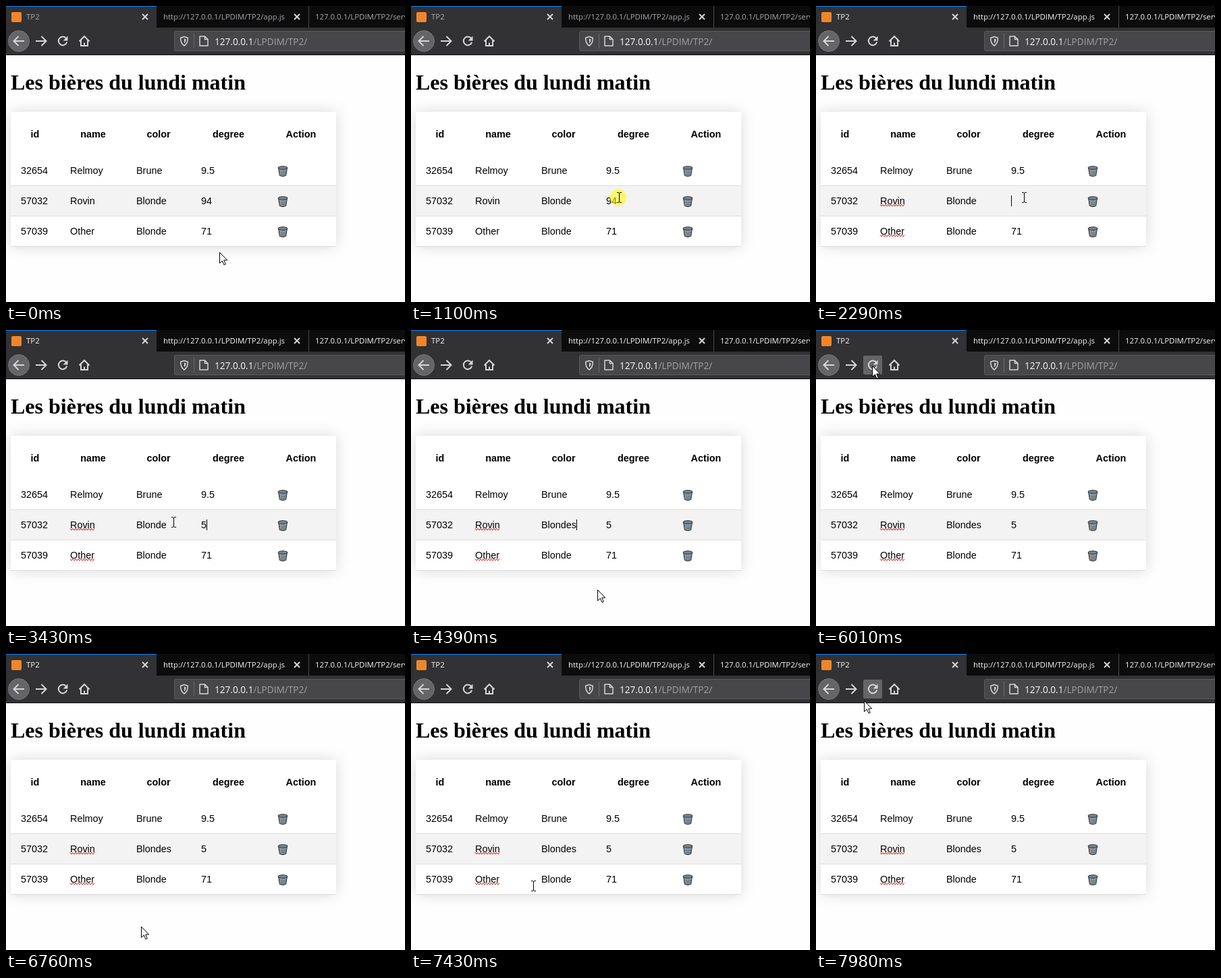
Animation of 591x439 px, one loop 8000 ms. Source, as an HTML page:

```html
<!DOCTYPE html>
<html lang="fr">
<meta charset="utf-8">
<title>TP2</title>
<style>
  html, body { margin: 0; width: 100%; height: 100%; overflow: hidden; background: #fefefe; }
  #card { position: absolute; left: 7px; top: 157px; width: 482px; height: 200px; background: #fff; box-shadow: 0 0 20px rgba(0,0,0,.15); }
  svg { position: absolute; left: 0; top: 0; }
  .ui { font-family: "Open Sans", "Noto Sans", sans-serif; }
  .tab { font-size: 11.4px; }
  .cell { font: 14.4px "Liberation Sans", Arial, sans-serif; }
  .head { font-weight: bold; text-anchor: middle; }
  .icon { fill: none; stroke: #d6d6d8; stroke-width: 2; }
  .thin { stroke-width: 1.5; stroke-linejoin: round; }
</style>
<body>
<div id="card"></div>
<svg width="591" height="439" viewBox="0 0 591 439">
  <defs>
    <g id="bin" stroke-linejoin="round">
      <path d="M-6.5-5L-4.7 6.5Q0 9 4.7 6.5L6.5-5z" fill="#94a5b1" stroke="#2b2e31"/>
      <path d="M-4.5-2L-3 6M-1.5-2L-1 7M1.500-2L1 7M4.500-2L3 6M-5 1Q0 3.500 5 1M-4.500 4Q0 6.500 4.500 4" fill="none" stroke="#56626c" stroke-width=".7"/>
      <path d="M-4 0L-3 5" stroke="#b58d5c"/>
      <ellipse cy="-5" rx="7" ry="2.3" fill="#7b868e" stroke="#2b2e31"/>
    </g>
    <path id="close" class="icon" d="M-4-4L4 4M4-4L-4 4"/>
  </defs>

  <!-- browser bars -->
  <path d="M0 0H591V32H0z" fill="#0c0c0d"/>
  <path d="M0 0H223V32H0zM0 32H591V72H0z" fill="#323234"/>
  <path d="M0 0H223V1H0z" fill="#0a84ff"/>
  <path d="M0 72H591V73H0z" fill="#0c0c0d"/>
  <path d="M448.5 0V32" stroke="#4a4a4c"/>
  <rect x="8" y="9" width="15" height="15" rx="2" fill="#f0862b"/>
  <g id="tabs" class="ui tab">
    <text x="30" y="20">TP2</text>
    <text x="233" y="20">http://127.0.0.1/LPDIM/TP2/app.js</text>
    <text x="458" y="20">127.0.0.1/LPDIM/TP2/server.php</text>
  </g>
  <use href="#close" x="206" y="16"/>
  <use href="#close" x="431" y="16"/>

  <rect id="hover" x="70" y="38" width="28" height="28" rx="2" fill="#656567"/>
  <circle cx="19" cy="52" r="15.5" fill="#656567" stroke="#777779"/>
  <path class="icon" d="M27 52H12M18.500 45L11.500 52L18.500 59M44 52H59M52.500 45L59.500 52L52.500 59"/>
  <path class="icon" d="M89.500 48.500A6.300 6.300 0 1 0 90.200 53.500"/>
  <path d="M91.500 44.500V51.500H84.500z" fill="#d6d6d8"/>
  <path class="icon" d="M108.500 52.500L116 45L123.500 52.500M111 51V59H121V51M116 59V54.500"/>
  <rect x="249.5" y="37.5" width="360" height="29" rx="2" fill="#474749" stroke="#5b5b5d"/>
  <path class="icon thin" d="M264 45.500L269.300 47.300Q269.500 55.500 264 59Q258.500 55.500 258.700 47.300z"/>
  <path d="M264 48.500L266.500 49.300Q266.500 53.500 264 55.500z" fill="#d6d6d8"/>
  <path d="M278.5 41V63" stroke="#6a6a6c"/>
  <path class="icon thin" d="M287 45H294.500L299 49.500V59H287zM294.500 45V49.500H299"/>
  <text class="ui" x="309" y="57.5" font-size="13.6" fill="#f9f9fa">127.0.0.1<tspan fill="#a0a0a2">/LPDIM/TP2/</tspan></text>

  <!-- page -->
  <text x="7" y="124" font-family="'Liberation Serif', 'Times New Roman', serif" font-size="32" font-weight="bold">Les bières du lundi matin</text>
  <path d="M7 267H489V311H7z" fill="#f3f3f3"/>
  <path d="M7 266.500H489M7 311.500H489M7 356.500H489" stroke="#ddd"/>
  <g id="table"></g>
  <path id="spell" fill="none" stroke="#e01010"/>
  <path id="caret" d="M.5 281V297" stroke="#000"/>
  <circle id="ring" r="12.5" fill="#ff0" fill-opacity=".55"/>
  <path id="arrow" d="M.5.500V16.500L4.300 13L7 19L9.300 18L6.700 12H11.700z" fill="#fff" stroke="#000"/>
  <path id="beam" d="M-3-7H-1L.5-6L2-7H4M.5-6V7M-3 8H-1L.5 7L2 8H4" fill="none" stroke="#000"/>
</svg>
<script>
const $ = id => document.getElementById(id);
const LOOP = 8000, BLINK = 530, FOCUS = 1220, BLUR = 7110;

const cols = [22, 95, 193, 289];
const rows = [
  ['32654', 'Relmoy', 'Brune', '9.5'],
  ['57032', 'Rovin', 'Blonde', '94'],
  ['57039', 'Other', 'Blonde', '71']
];
const heads = { id: 43, name: 129, color: 226, degree: 329.5, Action: 437 };
const baseline = r => 249 + 45 * r;

$('table').innerHTML =
  Object.entries(heads).map(([s, x]) => `<text class="cell head" x="${x}" y="195">${s}</text>`).join('') +
  rows.map((row, r) =>
    row.map((s, c) => `<text class="cell" id="c${r}${c}" x="${cols[c]}" y="${baseline(r)}">${s}</text>`).join('') +
    `<use href="#bin" x="410" y="${baseline(r) - 4}"/>`).join('');

const wave = r => `M95 ${baseline(r) + 0.5}` + 'l2 2.5l2-2.5'.repeat(9);
$('spell').setAttribute('d', wave(1) + wave(2));

// pointer moves: start, end, x, y reached; it rests in between
const moves = [
  [0, 0, 316, 365], [20, 760, 303, 291], [860, 940, 308, 284],
  [2940, 3430, 248, 285], [4040, 4450, 278, 391], [4450, 4750, 252, 354],
  [4850, 5110, 145, 99], [5110, 5590, 85, 51], [5690, 5770, 83, 53],
  [6010, 6600, 205, 416], [6600, 6760, 200, 404], [6860, 7110, 193, 373],
  [7300, 7980, 71, 69]
];
const clicks = [[1100, 1310], [3460, 3610], [BLUR, 7300]];

// edits in the second row: time, column, text before the caret
const edits = [
  [FOCUS, 3, '94'], [2220, 3, '9'], [2260, 3, ''], [2500, 3, '5'],
  [3510, 2, 'Blonde'], [4110, 2, 'Blondes']
];
const blinkStarts = [FOCUS, 2260, 3510, 4110];

const ease = u => u * u * (3 - 2 * u);
const show = (id, on) => $(id).setAttribute('visibility', on ? 'visible' : 'hidden');
const place = (id, x, y) => $(id).setAttribute('transform', `translate(${x} ${y})`);

function pointer(t) {
  let [, , x, y] = moves[0];
  for (const [from, to, nx, ny] of moves) {
    if (t <= from) break;
    const k = ease(Math.min(1, (t - from) / (to - from)));
    x += (nx - x) * k;
    y += (ny - y) * k;
  }
  return [Math.round(x), Math.round(y)];
}

function drawPointer(t) {
  const [x, y] = pointer(t);
  const overText = (y > 95 && y < 133 && x < 355) || (y > 222 && y < 357);
  place('arrow', x, y);
  place('beam', x, y + 0.5 - 1);
  place('ring', x - 1, y);
  show('arrow', !overText);
  show('beam', overText);
  show('ring', clicks.some(([from, to]) => t >= from && t < to));
  show('hover', x > 67 && x < 100 && y > 34 && y < 71);
}

function drawText(t) {
  $('c13').textContent = rows[1][3];
  $('c12').textContent = rows[1][2];
  let cell, col;
  for (const [time, c, text] of edits) {
    if (t < time) break;
    col = c;
    cell = $('c1' + c);
    cell.textContent = text;
  }
  const since = t - blinkStarts.filter(s => s <= t).pop();
  const on = cell && t < BLUR && since % (2 * BLINK) < BLINK;
  show('caret', on);
  if (on) place('caret', Math.floor(cols[col] + cell.getComputedTextLength()), 0);

  $('tabs').setAttribute('fill', t < FOCUS ? '#a9a9ab' : '#f9f9fa');
  show('spell', t >= FOCUS);
}

const start = performance.now();
function tick() {
  const t = (performance.now() - start) % LOOP;
  drawPointer(t);
  drawText(t);
  requestAnimationFrame(tick);
}
tick();
</script>
</body>
</html>
```
